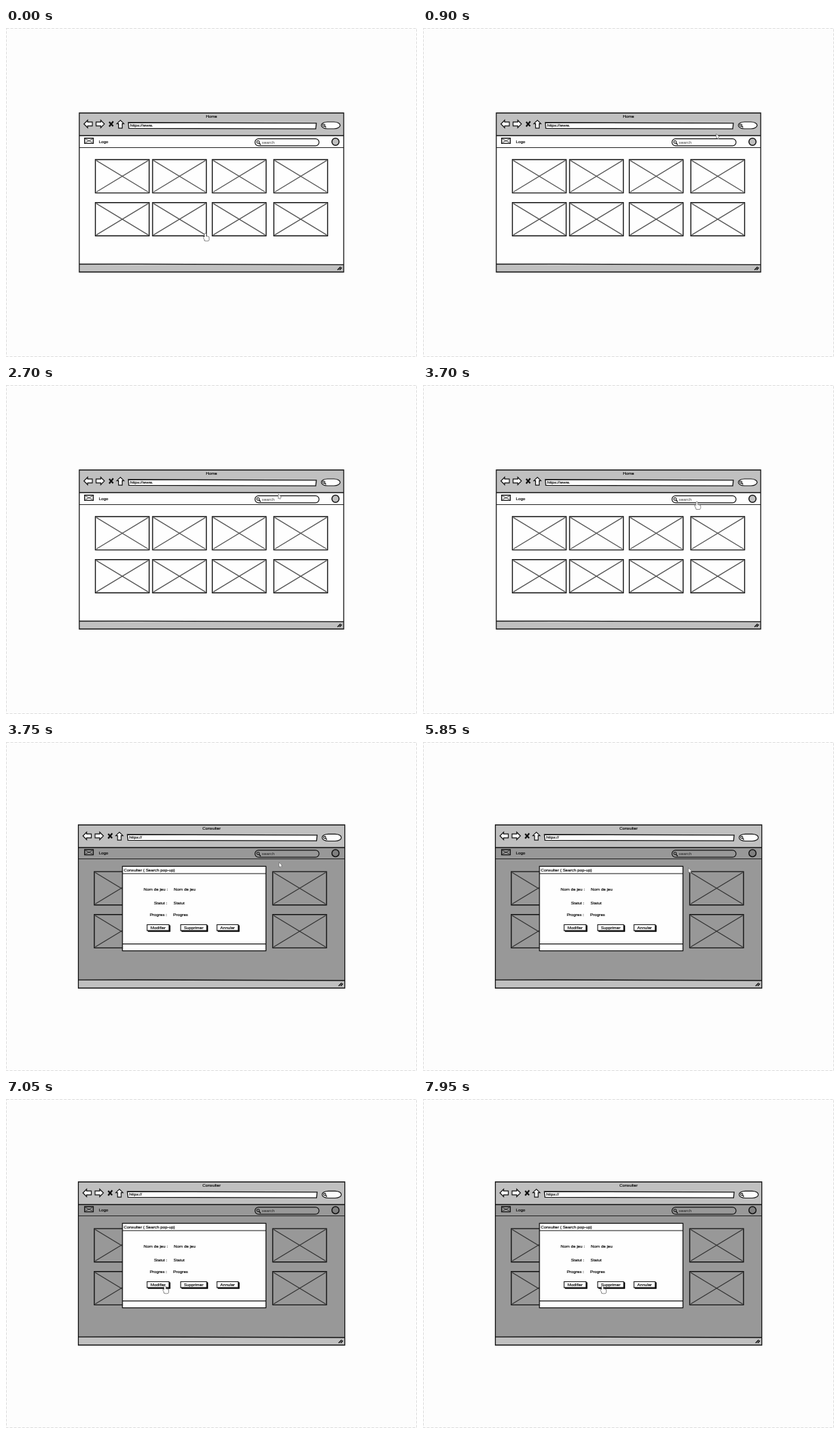
These frames come from a looping animation (600 by 480 pixels, 8 s). An HTML page with a canvas:

```html
<!DOCTYPE html>
<html lang="fr">
<head>
<meta charset="utf-8">
<title>Wireframe</title>
<style>
html, body { margin: 0; width: 100%; height: 100%; overflow: hidden; background: #fdfdfd; }
canvas { display: block; }
</style>
</head>
<body>
<canvas id="stage" width="600" height="480"></canvas>
<script>
const ctx = document.getElementById('stage').getContext('2d');
const LOOP = 8000, STEP = 50, CUT = 3750;
const INK = '#111', GREY = '#c0c0c0', WHITE = '#fefefe', DIM = '#989898';
const FONT = '6.2px "Liberation Sans", Arial, sans-serif';

const COLS = [130.5, 214, 301.2, 391], ROWS = [192, 254.7];
const IMG_W = 78.5, IMG_H = 48.6;
const BUTTONS = [
  { label: 'Modifier', x: 206, w: 32 },
  { label: 'Supprimer', x: 255, w: 38 },
  { label: 'Annuler', x: 308, w: 31 }
];

function paint(fill, stroke, width) {
  if (fill) { ctx.fillStyle = fill; ctx.fill(); }
  if (stroke) { ctx.strokeStyle = stroke; ctx.lineWidth = width; ctx.stroke(); }
}

function at(x, y, turn, body) {
  ctx.save();
  ctx.translate(x, y);
  ctx.rotate(turn);
  body();
  ctx.restore();
}

function line(x1, y1, x2, y2, color = INK, width = 1.2, bow = 0) {
  ctx.beginPath();
  ctx.moveTo(x1, y1);
  ctx.quadraticCurveTo((x1 + x2) / 2, (y1 + y2) / 2 + bow, x2, y2);
  paint(null, color, width);
}

function box(x, y, w, h, fill, stroke, width) {
  ctx.beginPath();
  ctx.rect(x, y, w, h);
  paint(fill, stroke, width);
}

function pill(x, y, w, h, fill, rx = h / 2) {
  ctx.beginPath();
  ctx.roundRect(x, y, w, h, { x: rx, y: h / 2 });
  paint(fill, INK, 1.2);
}

function disc(x, y, r, fill, width) {
  ctx.beginPath();
  ctx.arc(x, y, r, 0, Math.PI * 2);
  paint(fill, INK, width);
}

// A faint outline gives the letters their felt-pen weight
function text(s, x, mid, color = INK, align = 'left') {
  ctx.textAlign = align;
  ctx.fillStyle = ctx.strokeStyle = color;
  ctx.lineWidth = 0.2;
  ctx.fillText(s, x, mid + 2.2);
  ctx.strokeText(s, x, mid + 2.2);
}

function lens(x, y, r) {
  disc(x, y, r, null, 1.1);
  line(x + r * 0.7, y + r * 0.7, x + r * 2, y + r * 2, INK, 1.4);
}

function crossed(x, y, w, h, fill, color, width, edge) {
  box(x, y, w, h, fill);
  const l = x + edge, t = y + edge, r = x + w - edge, b = y + h - edge;
  line(l, t, r, b, color, width);
  line(r, t, l, b, color, width);
  box(x, y, w, h, null, INK, edge);
}

function blockArrow(x, y, turn, size) {
  at(x, y, turn, () => {
    const head = -0.8, half = [[-6.2, 0], [head, 5.5], [head, 2.8], [6, 2.8]];
    const mirror = half.map(([px, py]) => [px, -py]).reverse();
    ctx.beginPath();
    for (const [px, py] of half.concat(mirror)) ctx.lineTo(px * size, py * size);
    ctx.closePath();
    paint(WHITE, INK, 1.2);
  });
}

function toolbar(dx, dy) {
  at(dx, dy, 0, () => {
    blockArrow(120, 140, 0, 1);
    blockArrow(137.5, 140, Math.PI, 1);
    blockArrow(167, 140.4, Math.PI / 2, 0.94);
    line(150.6, 137, 156.4, 143.2, INK, 2.2);
    line(156.6, 136.2, 150.6, 143.8, INK, 2.2);
  });
}

function urlBar(x, y, w, label) {
  ctx.beginPath();
  ctx.moveTo(x, y);
  ctx.lineTo(x + w, y + 0.8);
  ctx.lineTo(x + w - 0.8, y + 9.2);
  ctx.lineTo(x + 0.8, y + 8.4);
  ctx.closePath();
  paint(WHITE, INK, 1.3);
  text(label, x + 2.7, y + 4.2);
}

function navRow(dy, paper, knob) {
  at(0, dy, 0, () => {
    crossed(114.8, 160.8, 12.6, 7.6, paper, INK, 0.8, 1.4);
    text('Logo', 135.5, 165.4);
    pill(363.5, 161.7, 93.5, 10.2, paper);
    lens(368, 166.4, 1.9);
    text('search', 373.6, 166.4, paper === WHITE ? '#777' : '#444');
    disc(481, 166, 5.2, knob, 1.5);
  });
}

function browser(x, y, w, h, footH, navY, paper) {
  const r = x + w, b = y + h, foot = b - footH, head = y + 33;
  box(x, y, w, h, paper);
  box(x, y, w, head - y, GREY);
  box(x, foot, w, footH, GREY);
  line(x, head, r, head, INK, 1.3);
  line(x, navY, r, navY, '#222', 1);
  line(x, foot - 0.3, r, foot + 0.6, INK, 1.3, -0.8);
  box(x, y, w, h, null, INK, 1.3);
  line(r - 9, b - 3, r - 4.5, b - 7.6, INK, 1.5);
  line(r - 6, b - 3, r - 2.8, b - 6.4, INK, 1.5);
}

function images(dx, dy, paper) {
  const color = paper === WHITE ? '#555' : '#333';
  for (const y of ROWS) {
    for (const x of COLS) crossed(x + dx, y + dy, IMG_W, IMG_H, paper, color, 1.3, 1.4);
  }
}

function home() {
  browser(107, 124, 386, 232, 11.2, 174.5, WHITE);
  text('Home', 300, 129, INK, 'center');
  toolbar(0, 0);
  urlBar(178.5, 138, 274.5, 'https://www.');
  pill(460.3, 137, 27.5, 10, WHITE, 9);
  lens(464, 141.8, 1.6);
  navRow(0, WHITE, GREY);
  images(0, 0, WHITE);
}

function field(label, mid, y) {
  text(label + ' :', mid - 4.5, y, INK, 'right');
  text(label, mid + 4.5, y);
}

function popup() {
  box(170, 181.3, 209.5, 123.4, WHITE, INK, 1.3);
  line(170, 192, 379.5, 192, INK, 1);
  line(170, 294.6, 379.5, 294.6, INK, 1.1);
  text('Consulter ( Search pop-up)', 172, 186.6);
  field('Nom de jeu', 240.6, 215);
  field('Statut', 240, 235);
  field('Progres', 239.5, 252.2);
  for (const { label, x, w } of BUTTONS) {
    box(x + 1.6, 267.8, w, 8.8, INK, INK, 1);
    box(x, 266.5, w, 8.6, WHITE, INK, 1.1);
    text(label, x + w / 2, 271, INK, 'center');
  }
}

function consult() {
  browser(105.6, 121, 389, 238, 11.6, 170.5, DIM);
  text('Consulter', 300, 126.2, INK, 'center');
  toolbar(-1.5, -3);
  urlBar(177.2, 135, 277, 'https://');
  pill(461.5, 134.3, 28, 10.2, WHITE, 9);
  lens(465.3, 139.2, 1.6);
  navRow(-3.8, DIM, '#808080');
  images(-1.6, -2.9, DIM);
  popup();
}

function hand(x, y) {
  at(x, y, 0, () => {
    ctx.beginPath();
    ctx.roundRect(-0.9, -0.2, 1.9, 7, 0.9);
    ctx.roundRect(-1.4, 4.2, 6.6, 6.4, 2);
    ctx.ellipse(-1.4, 6.4, 0.9, 2, -0.6, 0, Math.PI * 2);
    paint(null, '#666', 1.4);
    paint(WHITE);
  });
}

function arrow(x, y) {
  at(x, y, 0, () => {
    line(1.6, 4, 3.2, 7.6, '#666', 2);
    ctx.beginPath();
    ctx.moveTo(0, 0);
    ctx.lineTo(0, 6.8);
    ctx.lineTo(4.8, 4.9);
    ctx.closePath();
    paint(WHITE, '#666', 0.7);
    line(1.6, 4, 3, 7.2, WHITE, 1);
  });
}

const mix = (a, b, s) => a + (b - a) * s;

function ramp(t, from, to) {
  const s = Math.min(1, Math.max(0, (t - from) / (to - from)));
  return s * s * (3 - 2 * s);
}

// One wide sweep round the page
function sweep(t) {
  const s = t / 850, a = s * 3.87;
  return [291 - 174 * Math.sin(a), 242 + (58 + 58 * s) * Math.cos(a)];
}

// Circling the search field, narrower towards the end
function circle(t) {
  const a = 0.37 + (t - 1950) / 875 * Math.PI * 2, k = ramp(t, 2300, 2600);
  return [mix(392, 368, k) + mix(57, 34, k) * Math.cos(a), 162 + 14 * Math.sin(a + 0.3)];
}

// Glides in the pop-up: start, end, target and sideways bow
const GLIDES = [
  { from: 3750, to: 4000, x: 396, y: 181, bx: 0, by: 0 },
  { from: 5800, to: 6150, x: 240, y: 227, bx: 0, by: 0 },
  { from: 6300, to: 7050, x: 232, y: 273, bx: -29, by: 0 },
  { from: 7250, to: 7750, x: 259, y: 273, bx: 0, by: 25 },
  { from: 7900, to: 7950, x: 262, y: 273, bx: 0, by: 0 }
];

function glide(t) {
  let x = 398.5, y = 175.5;
  for (const g of GLIDES) {
    const s = ramp(t, g.from, g.to), bow = Math.sin(Math.PI * s);
    x = mix(x, g.x, s) + g.bx * bow;
    y = mix(y, g.y, s) + g.by * bow;
  }
  return [x, y];
}

function overLink(x, y, open) {
  const within = (l, t, w, h) => x >= l && x <= l + w && y >= t && y <= t + h;
  if (open) return BUTTONS.some(b => within(b.x, 266, b.w + 2, 11));
  return within(363, 161, 94, 11.5) ||
    ROWS.some(r => COLS.some(c => within(c, r, IMG_W, IMG_H)));
}

function border() {
  ctx.setLineDash([4, 2]);
  box(0.5, 0.5, 599, 479, null, '#dcdcdc', 1);
  ctx.setLineDash([]);
}

function draw(t) {
  const open = t >= CUT;
  ctx.fillStyle = '#fdfdfd';
  ctx.fillRect(0, 0, 600, 480);
  ctx.font = FONT;
  border();
  (open ? consult : home)();
  const [x, y] = (open ? glide : t < 850 ? sweep : circle)(t);
  (overLink(x, y, open) ? hand : arrow)(x, y);
}

const start = performance.now();
function tick() {
  const t = Math.max(0, performance.now() - start) % LOOP;
  draw(Math.floor(t / STEP) * STEP);
  requestAnimationFrame(tick);
}
tick();
</script>
</body>
</html>
```
